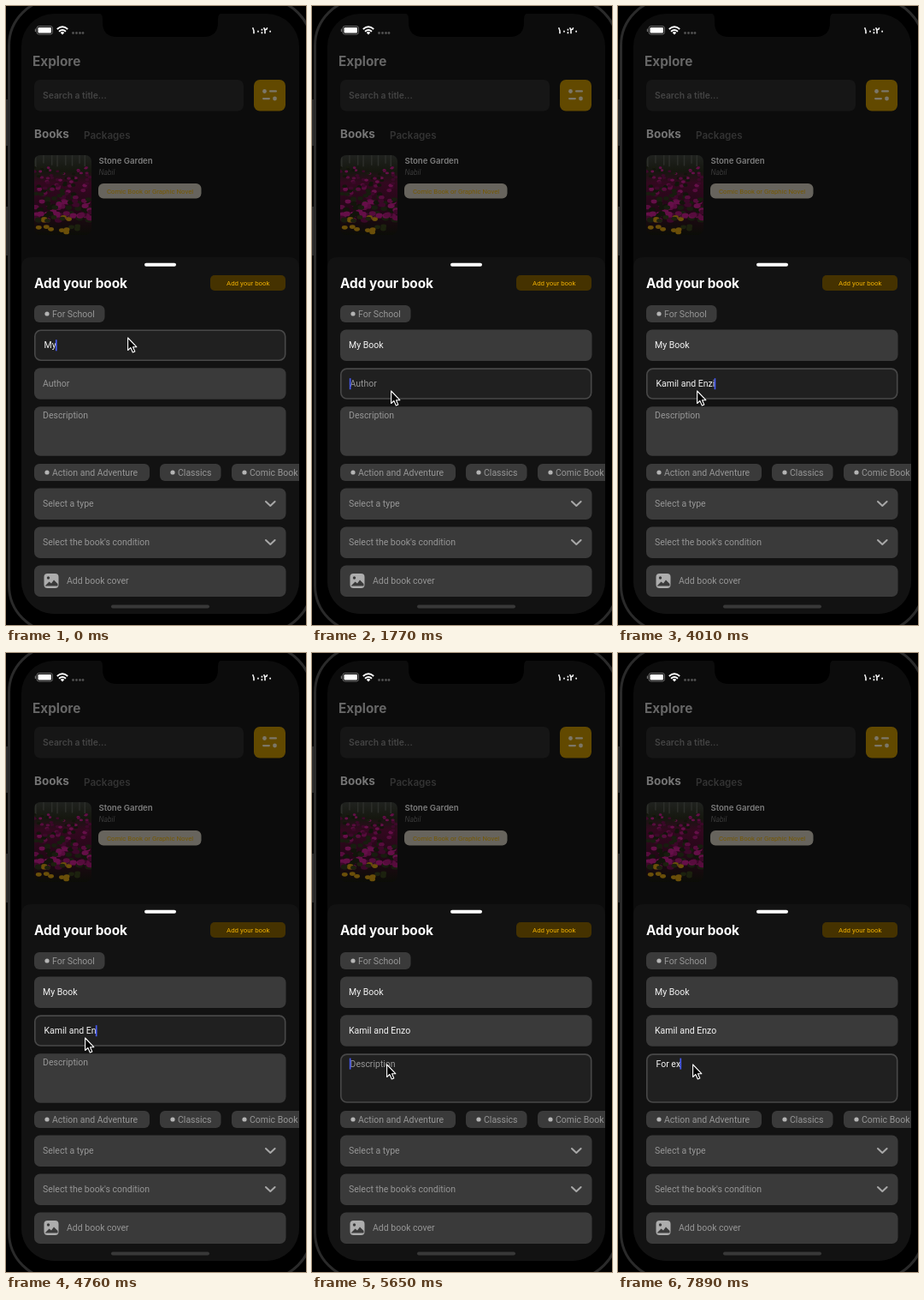
Recreate the animation shown at these times as an HTML page. Size 351 px wide and 722 px high, loop 8 s.

```html
<!DOCTYPE html>
<html lang="en">
<head>
<meta charset="utf-8">
<style>
html, body { margin: 0; width: 100%; height: 100%; overflow: hidden; background: #000; }
svg { display: block; width: 351px; height: 722px; }
text { font: 10.5px Roboto, sans-serif; fill: #969696; white-space: pre; }
.bold { font-family: Inter, sans-serif; font-weight: 700; }
.semi { font-family: Inter, sans-serif; font-weight: 600; }
.box { fill: #3a3a3a; }
.dot { fill: #b4b4b4; }
.line { fill: none; stroke: #a8a8a8; stroke-width: 2; stroke-linecap: round; stroke-linejoin: round; }
</style>
</head>
<body>
<svg viewBox="0 0 351 722">
  <defs>
    <clipPath id="screen"><rect x="18" y="9" width="325" height="700" rx="38"/></clipPath>
    <clipPath id="cover"><rect x="33" y="174" width="67" height="93" rx="7"/></clipPath>
    <linearGradient id="garden" x2="0" y2="1">
      <stop offset="0" stop-color="#20221f"/><stop offset=".2" stop-color="#15170f"/>
      <stop offset=".35" stop-color="#33081f"/><stop offset=".7" stop-color="#220716"/>
      <stop offset="1" stop-color="#0b0d07"/>
    </linearGradient>
  </defs>

  <!-- phone body -->
  <rect width="351" height="722"/>
  <path d="M0 109h2v54h-2zM0 234h2v57h-2z" fill="#2b2b2b"/>
  <rect x="3.500" y="-8" width="354" height="738" rx="54" fill="#000" stroke="#2a2a2a" stroke-width="3"/>

  <g clip-path="url(#screen)">
    <rect x="18" y="9" width="325" height="700" fill="#0c0c0c"/>

    <!-- dimmed page -->
    <text class="bold" x="31" y="70" style="font-size:15.3px;fill:#666">Explore</text>
    <rect x="33" y="86" width="245" height="36.500" rx="7" fill="#161616"/>
    <text class="semi" x="43" y="108" style="font-size:10.3px;fill:#444">Search a title...</text>
    <rect x="290" y="86" width="37" height="36.500" rx="7" fill="#624900"/>
    <g fill="#7c7768">
      <circle cx="302.500" cy="99.500" r="2.400"/><circle cx="314.500" cy="108" r="2.400"/>
      <rect x="308" y="98.300" width="9" height="2.200" rx="1.100"/>
      <rect x="300" y="107" width="9" height="2.200" rx="1.100"/>
    </g>
    <text class="bold" x="33" y="154" style="font-size:13.5px;fill:#747474">Books</text>
    <text class="semi" x="91" y="155" style="font-size:11.6px;fill:#333">Packages</text>
    <g id="photo" clip-path="url(#cover)">
      <rect x="33" y="174" width="67" height="93" fill="url(#garden)"/>
    </g>
    <text class="semi" x="108.500" y="183.500" style="font-size:9.6px;fill:#7c7c7c">Stone Garden</text>
    <text x="108.500" y="197" style="font-size:8.6px;font-style:italic;font-weight:300;fill:#4c4c4c">Nabil</text>
    <rect x="108" y="207" width="120.500" height="17.500" rx="6" fill="#67645d"/>
    <text x="118" y="218.500" style="font-size:7.8px;fill:#755800">Comic Book or Graphic Novel</text>

    <!-- sheet -->
    <path d="M18 710V305q0-12 12-12H331q12 0 12 12V710z" fill="#121212"/>
    <rect x="162" y="299.800" width="37" height="4" rx="2" fill="#fff"/>
    <text class="bold" x="33" y="328.500" style="font-size:15.3px;fill:#fff">Add your book</text>
    <rect x="239" y="314" width="88" height="18" rx="5" fill="#453200"/>
    <text x="258" y="325.800" style="font-size:7.9px;fill:#f0b000">Add your book</text>
    <g id="form"></g>
    <path class="line" d="M304 578l5.300 5 5.300-5M304 623l5.300 5 5.300-5"/>
    <rect x="44.500" y="662" width="17" height="17" rx="4" fill="#adadad"/>
    <path d="M45.500 676.500l5-5 2.500 2 3-4 4.500 4.500v2.500z" fill="#3a3a3a"/>
    <circle cx="49.500" cy="667" r="1.700" fill="#3a3a3a"/>
    <rect x="123" y="698.500" width="115" height="4" rx="2" fill="#383838"/>
  </g>

  <!-- notch and status bar -->
  <path d="M107 8q6 0 6 7v4q0 17 17 17h101q17 0 17-17v-4q0-7 6-7z"/>
  <g fill="#fff">
    <rect x="36" y="23.500" width="18.500" height="9.500" rx="2.500" fill="none" stroke="#6a6a6a"/>
    <rect x="37.500" y="25" width="15.500" height="6.500" rx="1.200"/>
    <rect x="33.800" y="26.500" width="1.300" height="3.500" rx=".6" fill="#6a6a6a"/>
    <path d="M66 33.500l-2.300-2.500q2.300-1.800 4.600 0z"/>
    <path d="M59.800 27q6.200-5.400 12.400 0M62 29.700q4-3.400 8 0" fill="none" stroke="#fff" stroke-width="1.900"/>
  </g>
  <g fill="#505050">
    <circle cx="78.500" cy="31.500" r="1.400"/><circle cx="82.500" cy="31.500" r="1.400"/>
    <circle cx="86.500" cy="31.500" r="1.400"/><circle cx="90" cy="31.500" r="1.400"/>
  </g>
  <text x="287" y="32" style="font:10px 'DejaVu Sans',sans-serif;fill:#fff;stroke:#fff;stroke-width:.6">١٠:٢٠</text>

  <rect id="caret" width="1.700" height="13" fill="#4659ee"/>
  <path id="mouse" d="M0 0V14.500L3.300 11.500 5.700 17 8.200 16 5.900 10.700H10.200Z" stroke="#fff" stroke-width="1.100" stroke-linejoin="round"/>
</svg>
<script>
const LOOP = 8000, TICK = 148.8, LEAD = 16;
const $ = id => document.getElementById(id);

function add(parent, tag, attrs, text = "") {
  const el = document.createElementNS("http://www.w3.org/2000/svg", tag);
  set(el, attrs);
  el.textContent = text;
  return parent.appendChild(el);
}
function set(el, attrs) {
  for (const k in attrs) el.setAttribute(k, attrs[k]);
}

const form = $("form");
const box = (y, height) => add(form, "rect", { class: "box", x: 33, y, width: 294.5, height, rx: 7 });
const label = (x, y, text) => add(form, "text", { x, y }, text);
function chip(x, y, width, text) {
  add(form, "rect", { class: "box", x, y, width, height: 20, rx: 6 });
  add(form, "circle", { class: "dot", cx: x + 15, cy: y + 10, r: 2.6 });
  label(x + 21, y + 13.5, text);
}

chip(33, 349, 82.5, "For School");
chip(33, 534, 135, "Action and Adventure");
chip(180, 534, 71.5, "Classics");
chip(264, 534, 140, "Comic Book or Graphic Novel");
[["Select a type", 562.5, 43], ["Select the book's condition", 607.5, 43], ["Add book cover", 652.5, 71]]
  .forEach(([text, y, x]) => { box(y, 36.5); label(x, y + 21.7, text); });

// Each entry of keys is [tick, typed text]; a field has focus from tick start to end.
const pair = "Kamil and ";
const fields = [
  { hint: "Title", y: 377.5, h: 36.5, base: 399.3, shift: 0, start: 0, end: 12,
    keys: [[0, "My"], [1, "My "], [2, "My B"], [3, "My Bo"], [4, "My Boo"], [5, "My Book"]] },
  { hint: "Author", y: 422.3, h: 36.5, base: 444.2, shift: 0, start: 12, end: 38,
    keys: [[12, ""], [16, "Ka"], [17, "Kam"], [18, "Kami"], [19, "Kamil"], [20, "Kamil "],
      [21, "Kamil an"], [22, "Kamil and"], [23, pair], [24, pair + "E"], [25, pair + "En"],
      [26, pair + "Enz"], [27, pair + "Enzi"], [28, pair + "Enz"], [31, pair],
      [32, pair + "En"], [33, pair + "Enzo"]] },
  { hint: "Description", y: 467.3, h: 57.5, base: 481, shift: 1.6, start: 38, end: 99,
    keys: [[37, ""], [48, "F"], [49, "Fo"], [50, "For"], [51, "For e"], [53, "For ex"]] }
];
for (const f of fields) {
  f.box = box(f.y, f.h);
  f.text = label(43, f.base, "");
}

const moves = [[0, 142.6, 387], [8, 127, 402], [9, 99, 438], [10, 92.6, 449],
  [35, 91, 454], [36, 88, 472], [37, 87.6, 480]];
const latest = (list, tick) => list.filter(k => k[0] <= tick).pop();

// Caret opacity by ticks since the last key
const blink = n => n < 4 || n > 7 ? 1 : n == 4 || n == 7 ? 0.5 : 0;

function paintField(f, tick) {
  const focus = tick >= f.start && tick < f.end;
  const [since, typed] = latest(f.keys, tick) || [0, ""];
  const inset = focus ? 0.8 : 0;
  const x = focus ? 44.5 : 43, base = f.base + (focus ? f.shift : 0);
  set(f.box, { x: 33 + inset, y: f.y + inset, width: 294.5 - 2 * inset, height: f.h - 2 * inset });
  f.box.style.cssText = focus ? "fill:#202020;stroke:#484848;stroke-width:1.6" : "";
  set(f.text, { x, y: base });
  f.text.textContent = typed || f.hint;
  f.text.style.fill = typed ? "#f4f4f4" : "";
  if (focus) {
    const end = typed ? f.text.getComputedTextLength() : 0;
    set($("caret"), { x: x + end - 0.7, y: base - 10, opacity: blink(tick - since) });
  }
}

function paintPhoto() {
  let seed = 7;
  const rnd = () => (seed = seed * 16807 % 2147483647) / 2147483647;
  const blob = (x, y, r, fill) =>
    add($("photo"), "ellipse", { cx: x, cy: y, rx: r, ry: r * 0.7, fill });
  for (let i = 0; i < 9; i++)
    add($("photo"), "rect", { x: 34 + i * 8 + rnd() * 4, y: 174, width: 1.5, height: 8 + rnd() * 7, fill: "#2c2e2a" });
  for (let i = 0; i < 150; i++) {
    const d = rnd();
    blob(33 + rnd() * 67, 188 + d * 62, 1.8 + d * 2.6, ["#570c3d", "#12140b", "#650f48", "#3c0829", "#181c0f"][i % 5]);
  }
  for (let i = 0; i < 16; i++)
    blob(36 + rnd() * 50, 246 + rnd() * 20, 3.4, i % 3 ? "#6b4f09" : "#1c210e");
}

function frame(now) {
  const tick = Math.floor((now % LOOP + LEAD) / TICK);
  for (const f of fields) paintField(f, tick);
  const [, x, y] = latest(moves, tick);
  set($("mouse"), { transform: `translate(${x} ${y})` });
  requestAnimationFrame(frame);
}

paintPhoto();
requestAnimationFrame(frame);
</script>
</body>
</html>
```
